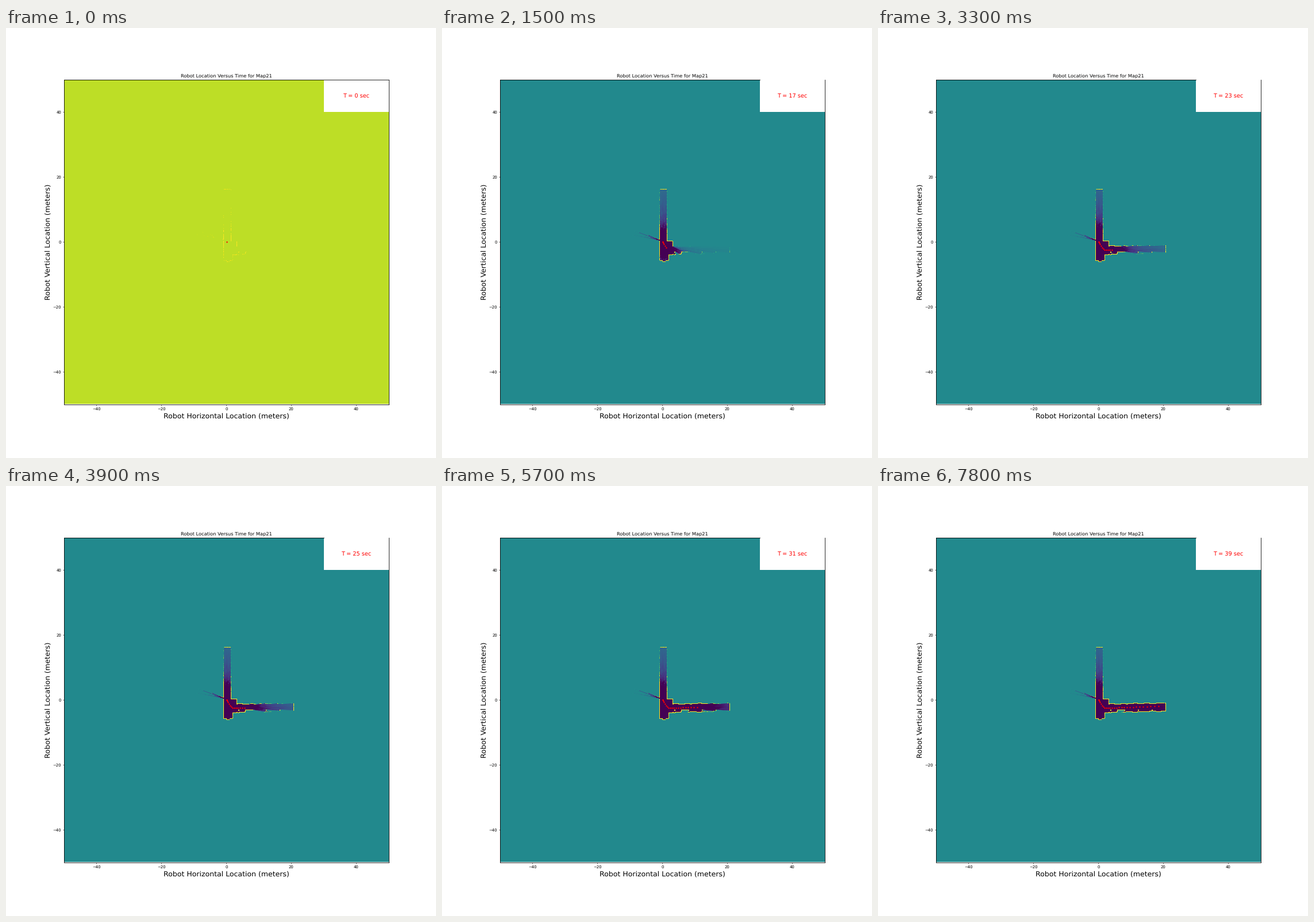
Write a matplotlib script that moves like this. It is 748 px wide and 748 px high and loops after 8000 ms.

```python
import numpy as np
import matplotlib.pyplot as plt
from matplotlib.animation import FuncAnimation
from matplotlib.patches import Rectangle

SIZE, DPI = 748, 50
TEXT_SCALE = SIZE / (15 * DPI)
LEFT, TOP, CELLS = 101, 90, 565         # map corner and width in stage pixels
X0, Y0, X1, Y1 = 325, 275, 510, 415     # window that holds the mapped rooms
STEPS, TICKS_PER_STEP, SCANS_PER_STEP = 27, 3, 3
UNKNOWN, FIRST_UNKNOWN = 0.474, 0.9
START_X, START_Y = 384, 372
RAYS = 720

plt.rcParams.update({"font.family": "DejaVu Sans", "text.hinting": "none",
                     "axes.linewidth": 1.2})
rng = np.random.default_rng(21)
yy, xx = np.mgrid[Y0:Y1, X0:X1] + 0.5


def room(left, top, right, bottom):
    return (xx > left) & (xx < right) & (yy > top) & (yy < bottom)


def passage():
    """Long side corridor, slightly tilted, with shallow niches."""
    axis = 387.5 - 0.02 * (xx - 400)
    half_width = 6.3 + 0.8 * (np.sin(xx / 3.2) > 0.3)
    return (np.abs(yy - axis) < half_width) & (xx > 400) & (xx < 500)


def doorway():
    """Narrow spokes of random length seen through the side door."""
    dx, dy = START_X - xx, START_Y - yy
    slope = dy / np.where(dx > 0, dx, np.inf)
    spoke = (slope * 25).astype(int).clip(0, 12)
    reach = rng.uniform(18, 52, 13)
    return (slope > 0.13) & (slope < 0.48) & (dx > 4) & (dx < reach[spoke])


def build_rooms():
    free = (room(379, 282, 391, 373) | room(379, 372, 401, 395)
            | room(379, 394, 394, 405) | room(384, 404, 389, 407)
            | passage() | doorway())
    for x in range(404, 480, 24):
        free &= ~room(x, 390, x + 2, 392)
    return free & ~room(416, 390, 429, 393)


free = build_rooms()


def pose(step):
    """Speeds up along the passage after easing down out of the corridor."""
    x = START_X + 0.347 * step ** 1.75
    u = np.clip(step / 8, 0, 1)
    y = START_Y + 15 * u * u * (3 - 2 * u) - 0.035 * (x - START_X)
    return x, y


def scan(step, strength, keep):
    """Cleared evidence (falls off as 1/r) and wall hits seen from one pose."""
    px, py = pose(step)
    angle = np.arange(RAYS) * 2 * np.pi / RAYS
    radius = np.arange(0.5, 190, 0.5)
    cols = (px + np.outer(np.cos(angle), radius)).astype(int) - X0
    rows = (py + np.outer(np.sin(angle), radius)).astype(int) - Y0
    cols = cols.clip(0, X1 - X0 - 1)
    rows = rows.clip(0, Y1 - Y0 - 1)
    first = np.argmax(~free[rows, cols], axis=1)
    reach = radius[first]

    dist = np.hypot(xx - px, yy - py)
    ray = np.rint(np.arctan2(yy - py, xx - px) * RAYS / (2 * np.pi)).astype(int) % RAYS
    streak = rng.uniform(0.4, 1.6, RAYS)[ray]
    cleared = np.where(dist <= reach[ray] + 0.5, strength * streak / (dist + 1), 0)

    hits = np.zeros(free.shape)
    seen = np.flatnonzero(rng.random(RAYS) < keep)
    ends = first[seen]
    np.add.at(hits, (rows[seen, ends], cols[seen, ends]), 0.25)
    hits[xx < 377] *= 0.3
    return cleared, hits


def as_map(unknown, level):
    grid = np.full((CELLS, CELLS), unknown)
    grid[Y0 - TOP:Y1 - TOP, X0 - LEFT:X1 - LEFT] = level
    return grid


def build_maps():
    _, hits = scan(0, 0, 0.4)
    maps = [as_map(FIRST_UNKNOWN,
                   FIRST_UNKNOWN + (1 - FIRST_UNKNOWN) * np.minimum(3 * hits, 1))]
    cleared_sum, hit_sum = np.zeros(free.shape), np.zeros(free.shape)
    for scan_number in range(1, (STEPS - 1) * SCANS_PER_STEP + 1):
        strength = 3 if scan_number <= SCANS_PER_STEP else 1.4
        cleared, hits = scan(scan_number / SCANS_PER_STEP, strength, 0.25)
        cleared_sum += cleared
        hit_sum += hits
        if scan_number % SCANS_PER_STEP == 0:
            open_level = UNKNOWN * (1 - np.minimum(cleared_sum, 1))
            wall_level = UNKNOWN + (1 - UNKNOWN) * np.minimum(hit_sum, 1)
            maps.append(as_map(UNKNOWN, np.where(free, open_level, wall_level)))
    return maps


maps = build_maps()
trail_x, trail_y = pose(np.arange(STEPS))
trail_x = (trail_x - LEFT) / CELLS * 100 - 50
trail_y = 50 - (trail_y - TOP) / CELLS * 100

fig = plt.figure(figsize=(SIZE / DPI, SIZE / DPI), dpi=DPI, facecolor="white")
ax = fig.add_axes([0.135, 0.125, 0.755, 0.755])
image = ax.imshow(maps[0], cmap="viridis", vmin=0, vmax=1, aspect="auto",
                  extent=(-50, 50, -50, 50), interpolation="nearest")
dots, = ax.plot([], [], "o", color="red", ms=3.4, mew=0)
ax.add_patch(Rectangle((30, 40), 20, 10, facecolor="white", lw=0, zorder=2.2))
clock = ax.text(40, 45, "", color="red", fontsize=14 * TEXT_SCALE,
                ha="center", va="center")

ax.set(xlim=(-50, 50), ylim=(-50, 50),
       xticks=range(-40, 41, 20), yticks=range(-40, 41, 20))
ax.tick_params(labelsize=10 * TEXT_SCALE)
ax.set_title("Robot Location Versus Time for Map21", fontsize=12 * TEXT_SCALE)
ax.set_xlabel("Robot Horizontal Location (meters)", fontsize=18 * TEXT_SCALE)
ax.set_ylabel("Robot Vertical Location (meters)", fontsize=18 * TEXT_SCALE)


def update(tick):
    step = tick // TICKS_PER_STEP
    image.set_data(maps[step])
    dots.set_data(trail_x[:step + 1], trail_y[:step + 1])
    # The clock panel hides its part of the top border once the run starts.
    ax.spines["top"].set_bounds(-50, 30 if step else 50)
    seconds = int(12 + 1.045 * step) if step else 0
    clock.set_text(f"T = {seconds} sec")
    return image, dots, clock


anim = FuncAnimation(fig, update, frames=80, interval=100, repeat=True, repeat_delay=0)
plt.show()
```
